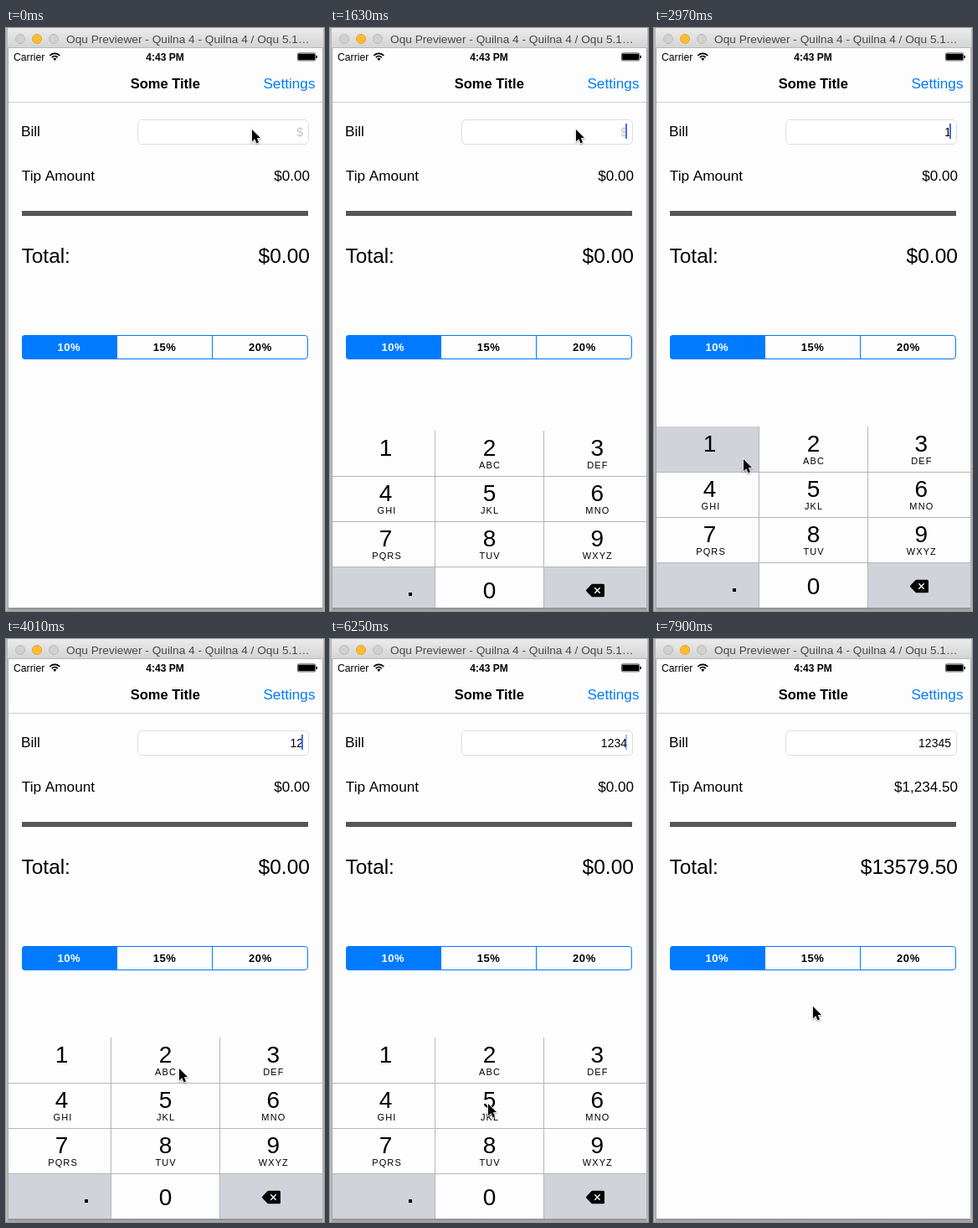
Animation of 380x695 px, one loop 8000 ms. Source, as an HTML page with a canvas:

```html
<!DOCTYPE html>
<html lang="en">
<head>
<meta charset="utf-8">
<title>Tip calculator</title>
<style>
  html, body { margin: 0; width: 100%; height: 100%; overflow: hidden; background: #fdfdfd; }
  canvas { display: block; width: 380px; height: 695px; }
</style>
</head>
<body>
<canvas id="stage"></canvas>
<script>
const W = 380, H = 695, LOOP = 8000;
const BLUE = '#007aff', PAPER = '#fdfdfd', KEY_GRAY = '#d0d3da', RULE = '#b4b6ba';
const FONT = '"Liberation Sans", Arial, sans-serif';

const canvas = document.getElementById('stage');
const ratio = window.devicePixelRatio || 1;
canvas.width = W * ratio;
canvas.height = H * ratio;
const c = canvas.getContext('2d');
c.scale(ratio, ratio);

// The screen refreshes in bursts: [first tick, number of ticks], 150 ms apart.
const BURSTS = [[0, 1], [1350, 1], [1480, 1], [1630, 7], [2970, 7], [4010, 8], [5200, 19]];
const STEP = 150;

// Taps on the keypad: time, digit, whether the key lights up.
const TAPS = [[2970, 1, true], [3870, 2, true], [4610, 3, false], [5350, 4, true], [6400, 5, true]];
const FOCUS = 1350, BLUR = 7300;

// Pointer stops: time, x, y.
const STOPS = [
  [0, 294, 121], [1680, 294, 121], [2530, 107, 514], [3050, 107, 514],
  [3420, 155, 519], [3800, 207, 512], [4080, 207, 512], [4530, 300, 512],
  [4650, 300, 512], [5200, 114, 547], [5430, 114, 547], [6170, 189, 554],
  [6500, 189, 554], [7180, 190, 438], [LOOP, 190, 438]
];

const LETTERS = ['', 'ABC', 'DEF', 'GHI', 'JKL', 'MNO', 'PQRS', 'TUV', 'WXYZ'];
const COL_X = [3, 126, 256, 379], COL_MID = [66.5, 190.5, 319.3];
const ROW_H = 54, PAD_H = 216, PAD_TOP = 475, FLOOR = 691;

function rect(x, y, w, h, fill) {
  c.fillStyle = fill;
  c.fillRect(x, y, w, h);
}

function round(x, y, w, h, r) {
  c.beginPath();
  c.roundRect(x, y, w, h, r);
}

function disc(x, y, r, fill, stroke) {
  c.beginPath();
  c.arc(x, y, r, 0, Math.PI * 2);
  c.fillStyle = fill;
  c.fill();
  if (stroke) {
    c.strokeStyle = stroke;
    c.lineWidth = 1;
    c.stroke();
  }
}

function poly(points) {
  c.beginPath();
  points.forEach(([x, y]) => c.lineTo(x, y));
  c.closePath();
}

function text(str, x, y, size, { align = 'left', color = '#000', weight = '', gap = 0 } = {}) {
  c.font = `${weight} ${size}px ${FONT}`;
  c.letterSpacing = gap + 'px';
  c.textAlign = align;
  c.fillStyle = color;
  c.fillText(str, x + (align === 'center' ? gap / 2 : 0), y);
}

function gradient(x0, y0, x1, y1, from, to) {
  const g = c.createLinearGradient(x0, y0, x1, y1);
  g.addColorStop(0, from);
  g.addColorStop(1, to);
  return g;
}

function snap(t) {
  const [start, count] = BURSTS.filter(b => b[0] <= t).pop();
  return start + STEP * Math.min(count - 1, Math.floor((t - start) / STEP));
}

// Critically damped spring: 1 at rest, falling to 0.
function spring(ms) {
  const k = Math.max(0, ms) * 0.019;
  return (1 + k) * Math.exp(-k);
}

function pointerAt(t) {
  const i = STOPS.findIndex(s => s[0] > t);
  const [t0, x0, y0] = STOPS[i - 1], [t1, x1, y1] = STOPS[i];
  const p = (t - t0) / (t1 - t0), e = p * p * (3 - 2 * p);
  return [x0 + (x1 - x0) * e, y0 + (y1 - y0) * e];
}

function caretAlpha(t, typed) {
  if (t < FOCUS || t >= BLUR) return 0;
  const since = typed.length ? typed[typed.length - 1][0] : 1500;
  const p = Math.max(0, t - since) % 1000 / 1000;
  if (p < 0.5) return 1;
  if (p < 0.7) return (0.7 - p) / 0.2;
  return Math.max(0, (p - 0.8) / 0.2);
}

function drawWindow() {
  rect(0, 0, W, H, '#a4a4a4');
  rect(0, 0, 3, H, gradient(0, 0, 3, 0, '#c6c6c6', '#a2a2a2'));
  rect(378, 0, 2, H, gradient(378, 0, 380, 0, '#a8a8a8', '#c0c0c0'));
  rect(3, FLOOR, 375, 4, gradient(0, FLOOR, 0, H, '#8e8e8e', '#ababab'));
  rect(3, 24, 375, FLOOR - 24, PAPER);
  rect(2, 0, 377, 24, gradient(0, 0, 0, 24, '#ebebeb', '#d3d3d3'));
  rect(2, 23, 377, 1, '#b9b9b9');
  disc(17, 13, 5.5, '#d0d0d0', '#bababa');
  disc(37, 13, 5.5, '#fdbc2f', '#e2a534');
  disc(57, 13, 5.5, '#d0d0d0', '#bababa');
  text('Oqu Previewer - Quilna 4 - Quilna 4 / Oqu 5.1…', 72, 18, 13.7, { color: '#484848' });
}

function drawStatus() {
  text('Carrier', 9, 38.5, 12.2);
  text('4:43 PM', 190, 38.5, 12, { align: 'center', weight: 'bold' });
  c.strokeStyle = '#000';
  c.lineWidth = 1.7;
  for (const r of [4.6, 8]) {
    c.beginPath();
    c.arc(58.3, 38.3, r, -Math.PI * 0.77, -Math.PI * 0.23);
    c.stroke();
  }
  poly([[58.3, 39], [56.2, 36.4], [58.3, 35.6], [60.4, 36.4]]);
  c.fillStyle = '#000';
  c.fill();
  c.lineWidth = 0.7;
  round(348.4, 29.9, 21.4, 9, 1.6);
  c.stroke();
  round(349.2, 30.7, 19.8, 7.4, 0.8);
  c.fill();
  round(370.4, 32.7, 1.5, 3.4, 0.7);
  c.fill();
}

function drawForm(value, alpha, done) {
  text('Some Title', 190.3, 72, 16.5, { align: 'center', weight: 'bold' });
  text('Settings', 369.5, 72, 17.2, { align: 'right', color: BLUE });
  rect(3, 88, 375, 1, '#cfcfcf');

  text('Bill', 18, 129, 17.2);
  round(157.5, 109.5, 204, 29, 4.5);
  c.fillStyle = '#fff';
  c.fill();
  c.strokeStyle = '#dedede';
  c.lineWidth = 1;
  c.stroke();
  text(value || '$', 355, 129, 14, { align: 'right', color: value ? '#000' : '#c0c0c5' });
  if (alpha) {
    c.globalAlpha = alpha;
    rect(353, 114, 2, 18, '#426bf2');
    c.globalAlpha = 1;
  }

  text('Tip Amount', 18.8, 181.5, 17.2);
  text(done ? '$1,234.50' : '$0.00', 363, 181.5, 17.1, { align: 'right' });
  rect(19, 218, 342, 6, '#555');
  text('Total:', 18.6, 280, 24.4);
  text(done ? '$13579.50' : '$0.00', 363, 280, 24.6, { align: 'right' });
}

function drawTabs() {
  c.save();
  round(19, 366, 342, 29, 4);
  c.clip();
  rect(19, 366, 114, 29, BLUE);
  rect(246, 366, 1, 29, BLUE);
  c.restore();
  round(19.5, 366.5, 341, 28, 3.5);
  c.strokeStyle = BLUE;
  c.lineWidth = 1;
  c.stroke();
  ['10%', '15%', '20%'].forEach((label, i) => {
    text(label, 75 + i * 114.3, 385, 13,
      { align: 'center', weight: 'bold', gap: 0.6, color: i ? '#000' : '#fff' });
  });
}

function drawDelete(x, y) {
  c.fillStyle = c.strokeStyle = '#000';
  c.lineJoin = 'round';
  c.lineWidth = 3;
  poly([[x - 9.5, y], [x - 3.5, y - 6.2], [x + 9.5, y - 6.2], [x + 9.5, y + 6.2], [x - 3.5, y + 6.2]]);
  c.fill();
  c.stroke();
  c.strokeStyle = '#fff';
  c.lineWidth = 1.4;
  c.beginPath();
  for (const s of [-1, 1]) {
    c.moveTo(x - 0.7, y - 3.2 * s);
    c.lineTo(x + 5.7, y + 3.2 * s);
  }
  c.stroke();
}

function drawPad(offset, lit) {
  if (offset >= PAD_H) return;
  const top = PAD_TOP + offset;
  c.save();
  c.beginPath();
  c.rect(3, top, 375, FLOOR - top);
  c.clip();
  rect(3, top, 375, PAD_H, PAPER);
  rect(COL_X[0], top + 162, 122, ROW_H, KEY_GRAY);
  rect(COL_X[2], top + 162, 122, ROW_H, KEY_GRAY);
  LETTERS.forEach((letters, i) => {
    const col = i % 3, y = top + Math.floor(i / 3) * ROW_H;
    if (lit === i + 1) rect(COL_X[col], y, COL_X[col + 1] - COL_X[col], ROW_H, KEY_GRAY);
    text(String(i + 1), COL_MID[col], y + 30, 28, { align: 'center' });
    text(letters, COL_MID[col] + (col ? 0 : 1), y + 45.3, 11, { align: 'center', gap: 1.1 });
  });
  text('0', COL_MID[1], top + 199.5, 28, { align: 'center' });
  rect(94, top + 193, 4, 4, '#000');
  drawDelete(317, top + 190.5);
  for (let row = 1; row < 4; row++) rect(3, top + row * ROW_H, 375, 1, RULE);
  rect(125, top, 1, PAD_H, RULE);
  rect(255, top, 1, PAD_H, RULE);
  c.restore();
}

function drawPointer([x, y]) {
  c.save();
  c.translate(x, y);
  poly([[0, 0], [0, 14.2], [3.3, 11.2], [5.6, 16.4], [8, 15.3], [5.8, 10.3], [10, 10]]);
  c.lineJoin = 'miter';
  c.shadowColor = 'rgba(0,0,0,.4)';
  c.shadowBlur = 2 * ratio;
  c.shadowOffsetY = ratio;
  c.strokeStyle = '#fff';
  c.lineWidth = 1.6;
  c.stroke();
  c.shadowColor = 'transparent';
  c.fillStyle = '#000';
  c.fill();
  c.restore();
}

function draw(t) {
  const typed = TAPS.filter(tap => tap[0] <= t);
  const value = typed.map(tap => tap[1]).join('');
  const last = typed[typed.length - 1];
  const lit = last && last[2] && t - last[0] < 140 ? last[1] : 0;
  const held = t < 2530 || t >= 2970 ? t : 2530;
  const hidden = t < FOCUS ? 1 : t < BLUR ? spring(t - FOCUS + 16) : 1 - spring(t - BLUR + 16);

  drawWindow();
  drawStatus();
  drawForm(value, caretAlpha(held, typed), t >= BLUR);
  drawTabs();
  drawPad(Math.round(hidden * PAD_H), lit);
  drawPointer(pointerAt(t));
}

let start;
function frame(now) {
  if (start === undefined) start = now;
  draw(snap((now - start) % LOOP));
  requestAnimationFrame(frame);
}
requestAnimationFrame(frame);
</script>
</body>
</html>
```
